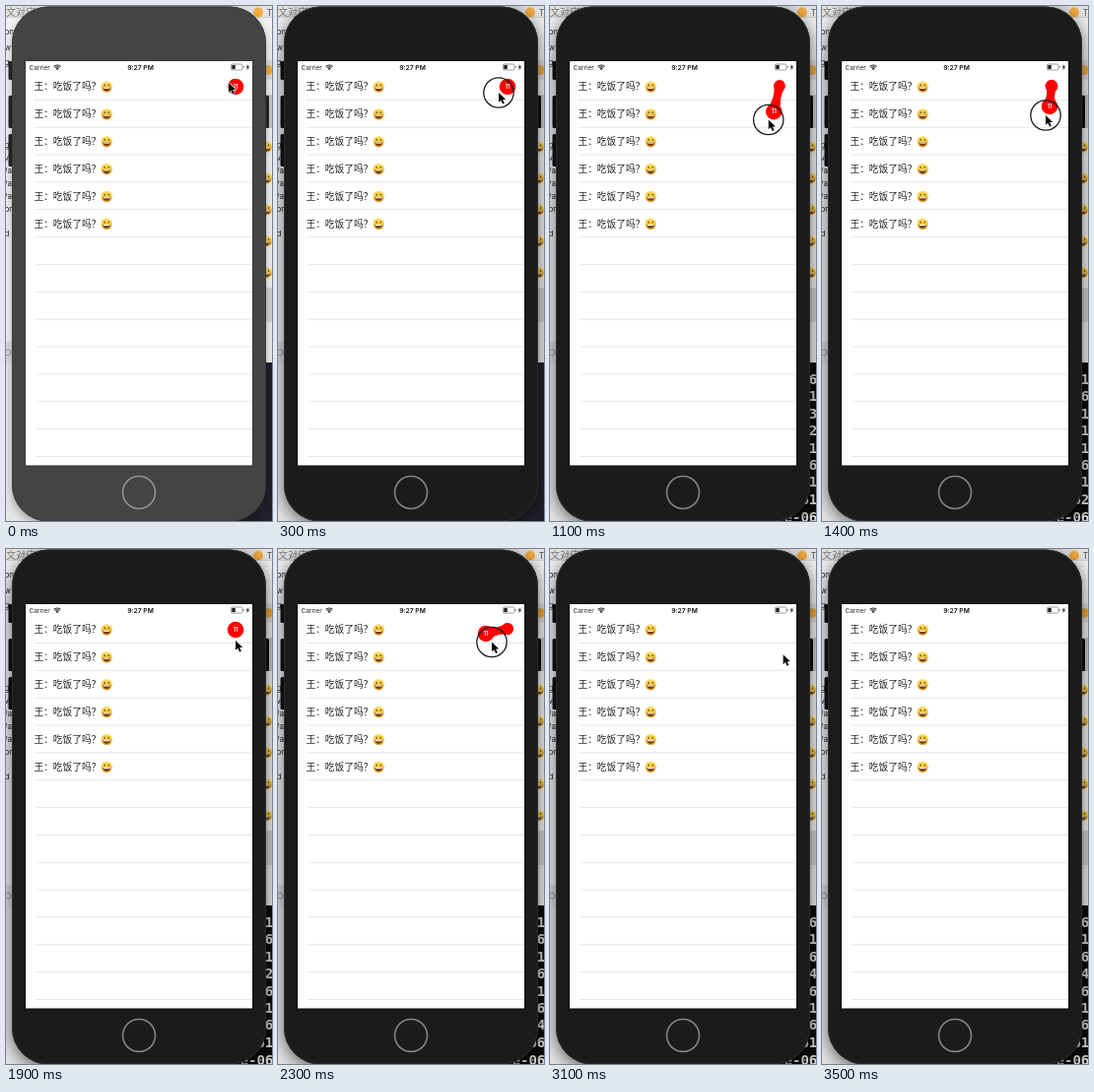
Recreate the animation shown at these times as an HTML page with a canvas. Size 270 by 523 pixels, loop 3.6 s.

```html
<!DOCTYPE html>
<html lang="zh">
<head>
<meta charset="utf-8">
<style>
html, body { margin: 0; width: 100%; height: 100%; overflow: hidden; background: #ddd; }
canvas { display: block; width: 270px; height: 523px; }
</style>
</head>
<body>
<canvas id="stage"></canvas>
<script>
const W = 270, H = 523, LOOP = 3600, STEP = 100;
const canvas = document.getElementById('stage');
const g = canvas.getContext('2d');
const dpr = window.devicePixelRatio || 1;
canvas.width = Math.round(W * dpr);
canvas.height = Math.round(H * dpr);

const CJK = '"Noto Sans CJK SC", "Noto Sans CJK", "Noto Sans", sans-serif';
const UI = 'Inter, "Liberation Sans", sans-serif';
const MONO = '"DejaVu Sans Mono", monospace';
const ROW = 27.85;
const HOME = [233, 82];

// Each key is [time, ...values]
const pointerKeys = [
  [0, 226, 78], [200, 224, 86], [300, 224, 88], [700, 212, 107],
  [1000, 220, 117], [1400, 227, 111], [1700, 233, 96], [1900, 233, 93],
  [2100, 237, 92], [2500, 197, 97], [2700, 196, 96], [3000, 214, 100],
  [3300, 282, 122]
];
const badgeKeys = [
  [300, ...HOME], [700, 221, 103], [1000, 226, 109], [1400, 231, 102],
  [1700, 233, 88], [1800, 233, 80], [1900, ...HOME], [2100, ...HOME],
  [2300, 211, 86], [2500, 191, 82]
];
const logKeys = [[400, 0], [700, 3], [1400, 11], [1900, 19], [2500, 27]];
const log = '616' + '14616132' + '16111612' + '16126161' + '61646161';

function at(keys, t) {
  if (t <= keys[0][0]) return keys[0].slice(1);
  for (let i = 1; i < keys.length; i++) {
    const a = keys[i - 1], b = keys[i];
    if (t <= b[0]) {
      const k = (t - a[0]) / (b[0] - a[0]);
      return a.slice(1).map((v, j) => v + (b[j + 1] - v) * k);
    }
  }
  return keys[keys.length - 1].slice(1);
}

function rect(x, y, w, h, color) {
  g.fillStyle = color;
  g.fillRect(x, y, w, h);
}

function box(x, y, w, h, r, color) {
  g.beginPath();
  g.roundRect(x, y, w, h, r);
  g.fillStyle = color;
  g.fill();
}

function disc(x, y, r, color) {
  g.beginPath();
  g.arc(x, y, r, 0, 7);
  g.fillStyle = color;
  g.fill();
}

function ring(x, y, r, width, color) {
  g.beginPath();
  g.arc(x, y, r, 0, 7);
  g.lineWidth = width;
  g.strokeStyle = color;
  g.stroke();
}

function text(s, x, y, font, color, align = 'left') {
  g.font = font;
  g.fillStyle = color;
  g.textAlign = align;
  g.textBaseline = 'alphabetic';
  g.fillText(s, x, y);
}

function smiley(x, y, r) {
  g.save();
  g.translate(x, y);
  g.scale(r, r);
  const skin = g.createLinearGradient(0, -1, 0, 1);
  skin.addColorStop(0, '#ffe165');
  skin.addColorStop(0.6, '#f9c637');
  skin.addColorStop(1, '#e08b1c');
  disc(0, 0, 1, skin);
  for (const side of [-1, 1]) {
    g.beginPath();
    g.ellipse(side * 0.36, -0.3, 0.12, 0.2, 0, 0, 7);
    g.fillStyle = '#6b4310';
    g.fill();
  }
  g.beginPath();
  g.arc(0, 0.08, 0.68, 0.05, Math.PI - 0.05);
  g.closePath();
  g.fillStyle = '#74400f';
  g.fill();
  rect(-0.55, 0.13, 1.1, 0.2, '#fff');
  g.restore();
}

function desktop(t) {
  rect(0, 0, W, H, '#f1f1f1');
  rect(0, 0, W, 11, '#e3e3e3');
  rect(0, 11, W, 0.7, '#c4c4c4');
  text('文对应', 0, 9.5, '10px ' + CJK, '#777');
  disc(256, 6.5, 5, '#f4ad3d');
  text('Ta', 264.5, 9.5, '9px ' + UI, '#555');

  const notes = [[29, 'on'], [45, 'w ('], [60, 'g'], [144, 'g'], [157, 'v'],
    [170, '/al'], [183, '/al'], [196, '/al'], [209, 'or'], [234, 'd I']];
  for (const [y, s] of notes) text(s, -1.5, y, '8px ' + UI, '#222');

  rect(0, 341, 20, 21, '#dcdcdc');
  ring(2, 352, 3, 1, '#999');
  rect(0, 362, 60, 161, '#e6e6e6');

  rect(250, 55, 20, 20, '#dedede');
  disc(266, 65, 5, '#f0ae42');
  rect(250, 90, 20, 34, '#c9c9c9');
  for (let i = 0; i < 5; i++) smiley(264.6, 143 + i * 31.9, 5.5);
  rect(250, 286, 20, 35, '#d2d2d2');
  rect(250, 321, 20, 41, '#ececec');
  terminal(t);
}

function terminal(t) {
  const active = t >= 400;
  rect(200, 362, 70, 161, active ? '#0b0b0d' : '#20202b');
  if (!active) return;
  const first = Math.floor(at(logKeys, t)[0] + 0.001);
  const font = 'bold 14px ' + MONO;
  for (let i = 0; i < 8; i++) {
    const digit = log[first + i] || '1';
    text(i === 7 ? '6' + digit : digit, 271.3, 384 + i * 17.4, font, '#ddd', 'right');
  }
  text('e-06', 271.3, 523.5, font, '#ddd', 'right');
}

function phone(t) {
  const focused = t >= 200;
  const body = focused ? '#1b1b1b' : '#444444';
  const key = focused ? '#111' : '#272727';
  for (const [y, h] of [[56, 19], [91, 33], [130, 33]]) box(2.5, y, 6, h, 1.5, key);
  box(261, 91, 6, 33, 1.5, key);

  g.save();
  g.shadowColor = focused ? 'rgba(0,0,0,.6)' : 'rgba(0,0,0,.3)';
  g.shadowBlur = (focused ? 18 : 10) * dpr;
  g.shadowOffsetY = 4 * dpr;
  box(6, 0.5, 258, 523, 37, body);
  g.restore();
  g.beginPath();
  g.roundRect(6.5, 1, 257, 522, 36.5);
  g.lineWidth = 1;
  g.strokeStyle = focused ? '#2c2c2c' : '#3a3a3a';
  g.stroke();
  ring(135, 494, 16.5, 1.6, focused ? '#858585' : '#929292');
  rect(19.5, 55.5, 231, 412, focused ? '#0a0a0a' : '#2b2b2b');
  rect(20, 56, 230, 410.5, '#fff');
}

function statusBar() {
  text('Carrier', 23.5, 64.5, '6.5px ' + UI, '#222');
  for (const r of [1.5, 3.3, 5]) {
    g.beginPath();
    g.arc(52, 65, r, -Math.PI * 0.75, -Math.PI * 0.25);
    g.lineWidth = 1.1;
    g.strokeStyle = '#222';
    g.stroke();
  }
  disc(52, 64.6, 0.7, '#222');
  text('9:27 PM', 136.5, 64.6, '600 6.7px ' + UI, '#111', 'center');

  g.beginPath();
  g.roundRect(228.4, 59, 11.6, 6, 1.2);
  g.lineWidth = 0.7;
  g.strokeStyle = '#777';
  g.stroke();
  rect(229.3, 59.9, 3.4, 4.2, '#222');
  rect(240.7, 61, 0.9, 2, '#777');
  g.beginPath();
  for (const [x, y] of [[246.2, 59], [243.5, 62.6], [245.2, 62.6], [244.4, 65.6], [247.2, 61.6], [245.5, 61.6]]) g.lineTo(x, y);
  g.fillStyle = '#222';
  g.fill();
}

function list() {
  for (let i = 0; i < 14; i++) {
    const y = 95.4 + i * ROW;
    rect(i < 6 ? 29 : 31, y - 0.4, 250 - (i < 6 ? 29 : 31), 0.8, '#e2e2e4');
    if (i < 6) {
      text('王：吃饭了吗？', 28.5, y - 10, '9.7px ' + CJK, '#222');
      smiley(102.2, y - 13.4, 5.7);
    }
  }
}

// Rubbery neck between the resting spot and the dragged badge
function neck(x, y) {
  const dx = x - HOME[0], dy = y - HOME[1], d = Math.hypot(dx, dy);
  if (d < 1 || d > 33) return;
  const r = 8.4 - d / 10, top = HOME[1] - d / 24;
  const nx = -dy / d, ny = dx / d;
  const mx = (x + HOME[0]) / 2, my = (y + top) / 2, big = 8;
  disc(HOME[0], top, r, '#f00');
  g.beginPath();
  g.moveTo(HOME[0] + nx * r, top + ny * r);
  g.quadraticCurveTo(mx + nx, my + ny, x + nx * big, y + ny * big);
  g.lineTo(x - nx * big, y - ny * big);
  g.quadraticCurveTo(mx - nx, my - ny, HOME[0] - nx * r, top - ny * r);
  g.fillStyle = '#f00';
  g.fill();
}

function badge(t) {
  const [x, y] = at(badgeKeys, t);
  if (t < 2600) {
    neck(x, y);
    disc(x, y, 8.3, '#f00');
    text('11', x, y + 2.2, '600 6.2px ' + UI, '#fff', 'center');
  } else if (t < 2900) {
    puff(x, y, (t - 2600) / 100);
  }
}

function puff(x, y, stage) {
  const spread = 2.8 + Math.max(0, stage - 1) * 2;
  const size = stage > 1 ? 1.1 : 1.9;
  for (let i = 0; i < 6; i++) {
    const a = i * Math.PI / 3 + 0.5;
    disc(x + Math.cos(a) * spread, y + Math.sin(a) * spread, size, '#dc9a55');
  }
  if (stage <= 1) {
    disc(x, y, 3.2, '#eebd83');
    disc(x, y + 0.4, 1.7, '#fff1dc');
  }
}

function pointer(t) {
  const [x, y] = at(pointerKeys, t);
  const pressed = (t >= 300 && t < 1800) || (t >= 2100 && t < 2600);
  if (pressed) ring(x, y, 15.2, 1.3, '#1c1c1c');
  g.beginPath();
  for (const [px, py] of [[0, 0], [0, 9.8], [2.3, 7.7], [4, 11.5], [5.8, 10.7], [4.2, 7], [7.2, 7]]) g.lineTo(x + px, y + py);
  g.closePath();
  g.lineJoin = 'round';
  g.lineWidth = 1.3;
  g.strokeStyle = '#fff';
  g.stroke();
  g.fillStyle = '#080808';
  g.fill();
}

function draw(now) {
  const t = Math.floor((now % LOOP) / STEP) * STEP;
  g.setTransform(dpr, 0, 0, dpr, 0, 0);
  desktop(t);
  phone(t);
  statusBar();
  list();
  badge(t);
  pointer(t);
}

const start = performance.now();
function tick() {
  draw(performance.now() - start);
  requestAnimationFrame(tick);
}
tick();
</script>
</body>
</html>
```
